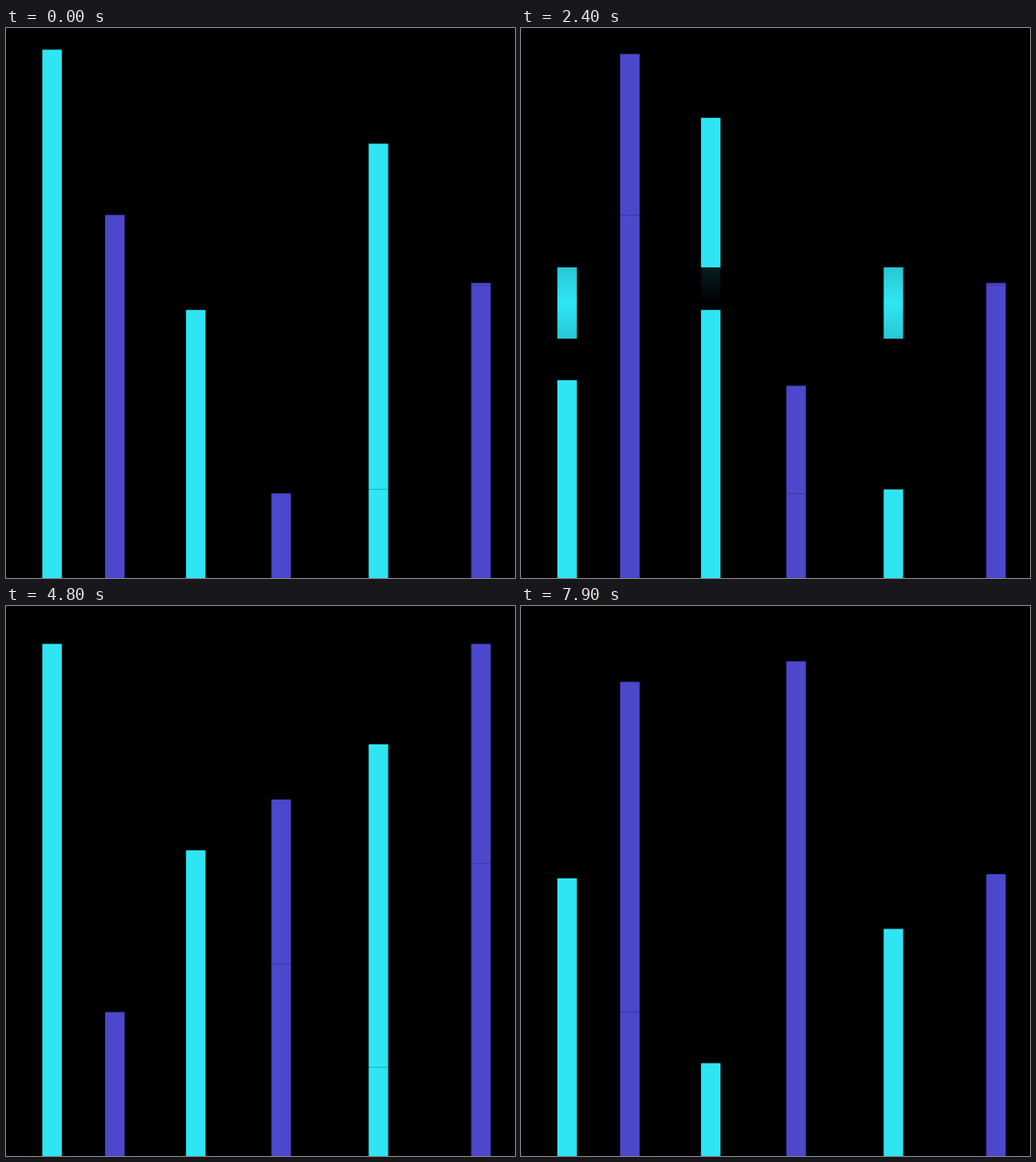
These frames come from a looping animation (600x648 px, 8000 ms). An HTML page with a canvas:

```html
<!DOCTYPE html>
<html lang="en">
<head>
<meta charset="utf-8">
<title>Bars</title>
<style>
  html, body { margin: 0; width: 100%; height: 100%; overflow: hidden; background: #000; }
  canvas { display: block; width: 100vw; height: 100vh; }
</style>
</head>
<body>
<canvas id="stage" width="600" height="648"></canvas>
<script>
const ctx = document.getElementById('stage').getContext('2d');
const WIDTH = 600, HEIGHT = 648, HALF = HEIGHT / 2;
const LOOP = 8000, STEP = 100;
const FIRST_WIPE = 1384, WIPE_PERIOD = 1944, WIPE_TIME = 1086;

const CYAN = '47,229,243', INDIGO = '75,72,204';
const BAR_WIDTH = 23;
const barLefts = [42.8, 116.8, 212.2, 312.8, 427.5, 548.4];

// Top edge of every bar on each slide
const slides = [
  [25.5, 220.3, 332.2, 548.3, 136.3, 300.4],
  [415, 30.6, 105.8, 421.5, 543.6, 303.2],
  [44.6, 478.5, 287.8, 228, 163, 44.6],
  [320.8, 89.4, 538.6, 65.2, 380.4, 316]
];

const clamp = (v, lo, hi) => Math.min(hi, Math.max(lo, v));

// Soft wipe from both edges to the centre; its ramp is cropped at the middle
function wipeGradient(rgb, progress, appearing) {
  const front = HALF - HEIGHT * progress;
  const inner = Math.max(0, front);
  const outer = Math.min(HALF, front + HALF);
  const rim = (outer - inner) / HALF;
  const gradient = ctx.createLinearGradient(0, 0, 0, HEIGHT);
  const stops = [
    [-HALF, 1], [-outer, 1], [-outer, rim], [-inner, 0],
    [inner, 0], [outer, rim], [outer, 1], [HALF, 1]
  ];
  for (const [distance, share] of stops) {
    const alpha = appearing ? share : 1 - share;
    gradient.addColorStop(clamp(0.5 + distance / HEIGHT, 0, 1), `rgba(${rgb},${alpha})`);
  }
  return gradient;
}

function draw(time) {
  const index = clamp(Math.floor((time - FIRST_WIPE) / WIPE_PERIOD), 0, slides.length - 2);
  const progress = clamp((time - FIRST_WIPE - index * WIPE_PERIOD) / WIPE_TIME, 0, 1);

  ctx.fillStyle = '#000';
  ctx.fillRect(0, 0, WIDTH, HEIGHT);

  barLefts.forEach((left, i) => {
    const rgb = i % 2 ? INDIGO : CYAN;
    const oldTop = slides[index][i], newTop = slides[index + 1][i];
    const fillBar = (top, bottom, style) => {
      ctx.fillStyle = style;
      ctx.fillRect(left, top, BAR_WIDTH, bottom - top);
    };
    const high = Math.min(oldTop, newTop), low = Math.max(oldTop, newTop);
    fillBar(high, low, wipeGradient(rgb, progress, newTop < oldTop));
    fillBar(low, HEIGHT, `rgb(${rgb})`);
  });
}

const start = performance.now();
function tick() {
  const time = (performance.now() - start) % LOOP;
  draw(Math.floor(time / STEP) * STEP);
  requestAnimationFrame(tick);
}
tick();
</script>
</body>
</html>
```
